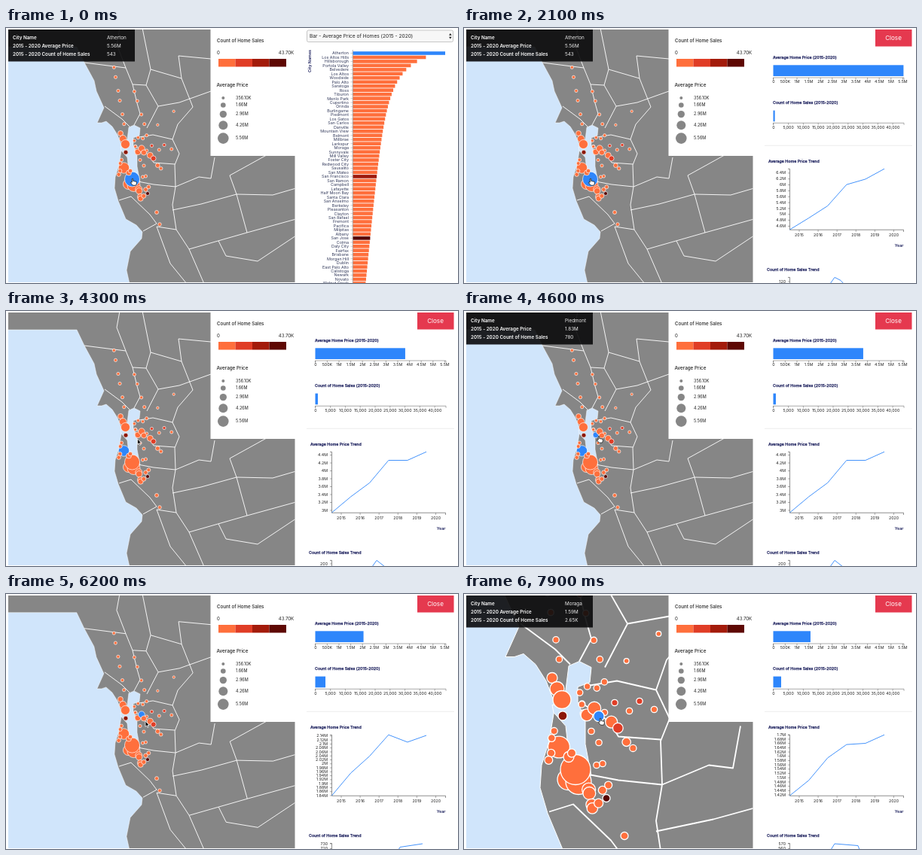
Recreate the animation shown at these times as an HTML page with a canvas. Size 600x339 px, loop 8000 ms.

```html
<!DOCTYPE html>
<html lang="en">
<head>
<meta charset="utf-8">
<title>Home sales map</title>
<style>
html, body { margin: 0; width: 100%; height: 100%; overflow: hidden; background: #fff; }
canvas { display: block; width: 600px; height: 339px; }
</style>
</head>
<body>
<canvas id="stage"></canvas>
<script>
const LOOP = 8000;
const canvas = document.getElementById('stage');
const ctx = canvas.getContext('2d');
const dpr = window.devicePixelRatio || 1;
canvas.width = 600 * dpr;
canvas.height = 339 * dpr;

const BLUE = '#2e86fb', ORANGE = '#ff6f3c', RED = '#e03d26', DARK = '#8c1708', DEEP = '#560503';
const NAVY = '#1b1f5c', LAND = '#868686', WATER = '#d0e5fb';

// ---------- data ----------
// price in millions, count in thousands; trend runs from min to max
const cities = {
  Atherton: { x: 167.5, y: 201, price: 5.56, count: 0.543, min: 4.485, max: 6.55,
    trend: [0, 0.19, 0.39, 0.74, 0.83, 1], sales: ['120', 337], peak: 'M486 340L492 331.5L500 335.5L504 340' },
  Hillsborough: { x: 156.5, y: 186, price: 3.84, count: 0.871, min: 2.943, max: 4.486,
    trend: [0, 0.26, 0.49, 0.86, 0.86, 1], sales: ['200', 336], peak: 'M486 340L492 331.5L503 340' },
  Piedmont: { x: 175, y: 164.7, price: 1.83, count: 0.78 },
  Orinda: { x: 180, y: 160.2, price: 2.06, count: 3.42, min: 1.84, max: 2.147,
    trend: [0, 0.37, 0.65, 1, 0.88, 0.99], sales: ['730', 332], peak: 'M521 340L523 336.5L553 332' },
  Moraga: { x: 183, y: 165.5, price: 1.59, count: 2.65, min: 1.4165, max: 1.701,
    trend: [0, 0.25, 0.62, 0.84, 0.86, 1], sales: ['570', 332], peak: 'M487 340L492 332L523 334.5L525 340' }
};

// towns follow the main roads: from, to, how many, first and last radius
const roads = [
  { a: [143, 51], b: [157, 129], n: 6 },
  { a: [170, 83], b: [184, 129], n: 4 },
  { a: [201, 127.5], b: [223, 112], n: 2, r: [1.7, 1.7] },
  { a: [152, 140], b: [158.5, 154.5], n: 3, r: [3.5, 6], zig: 0 },
  { a: [170, 148.5], b: [187, 144], n: 4 },
  { a: [171.5, 156], b: [173, 165], n: 4 },
  { a: [186, 160], b: [219, 158], n: 5, zig: 3, red: 2 },
  { a: [191, 168], b: [206, 188], n: 4, r: [4, 2.3], red: 4 },
  { a: [178, 175.5], b: [183, 183], n: 2, zig: 0 },
  { a: [153, 174], b: [150, 196], n: 4, r: [2.3, 2.7] },
  { a: [163, 192.5], b: [165, 190], n: 2, r: [3.5, 2.8], zig: 0 },
  { a: [181.5, 198], b: [185.5, 197], n: 2, zig: 0 },
  { a: [176, 213], b: [179, 228], n: 4, r: [4.5, 3.6] },
  { a: [182.5, 222], b: [189, 210], n: 3, r: [3, 2.5] },
  { a: [200, 245], b: [204, 261], n: 2, r: [2.5, 2.3], zig: 0 }
];

const coast = '94,25 104,46 117,70 120,84 130,106 121,126 127,126 133,124 141,131 148,142 154,158 ' +
  '150,182 145,198 144,213 149,230 159,254 173,262 181,271 180,280 165,297 160,322 164,340';
const bay = '163,132 170,129 178,133 177,143 169,146 169,156 174,168 174,184 178,205 170,203 163,190 161,172 ' +
  '153,163 152,158 159,158 161,148';
const borders = [
  '104,46 159,53 168,75 174,100 178,114 170,129',
  '159,53 147,22 151,0',
  '131,104 154,121 164,131',
  '168,75 186,76 202,104 187,133',
  '186,76 192,55 181,0',
  '192,55 233,67 248,105 228,128 221,148 195,142 177,145',
  '202,104 230,99 272,84',
  '233,67 229,37 272,41',
  '172,157 190,169 196,179 224,181',
  '221,148 230,167 224,182 225,211 196,208 175,204',
  '225,211 256,198 272,200 277,172',
  '150,229 166,224 191,248 200,260 182,270',
  '225,211 221,235 226,268 200,264 218,313 240,340',
  '226,268 243,294 263,340',
  '221,242 259,234 306,221 297,196 353,165',
  '306,221 354,222 385,213',
  '306,221 320,272 385,254',
  '243,294 320,272',
  '282,283 292,303 334,310 385,276'
];

const homes = ('Atherton,Los Altos Hills,Hillsborough,Portola Valley,Belvedere,Los Altos,Woodside,Palo Alto,Saratoga,Ross,' +
  'Tiburon,Menlo Park,Cupertino,Orinda,Burlingame,Piedmont,Los Gatos,San Carlos,Danville,Mountain View,Belmont,Millbrae,' +
  'Larkspur,Moraga,Sunnyvale,Mill Valley,Foster City,Redwood City,Sausalito,San Mateo,San Francisco,San Ramon,Campbell,' +
  'Lafayette,Half Moon Bay,Santa Clara,San Anselmo,Berkeley,Pleasanton,Clayton,San Rafael,Fremont,Pacifica,Milpitas,' +
  'Albany,San Jose,Colma,Daly City,Fairfax,Brisbane,Morgan Hill,Dublin,East Palo Alto,Calistoga,Newark,Novato,Walnut Creek').split(',');
const barLength = i => 46.5 - 0.53 * i + 76 * Math.exp(-0.4 * i ** 0.7);

// ---------- timeline ----------
const hovers = [[0, 'Atherton'], [2750, 'Hillsborough'], [4000, null], [4450, 'Piedmont'], [4800, 'Orinda'],
  [5250, 'Moraga'], [6100, null], [6850, 'Moraga']];
const picks = [[0, null], [500, 'Atherton'], [3750, 'Hillsborough'], [5100, 'Orinda'], [7400, 'Moraga']];
// each move: start, end, and the place reached
const moves = [[0, 1, 168, 200], [2400, 3000, 159, 184], [3850, 4500, 179, 166], [4650, 4850, 180.5, 161],
  [5100, 5350, 185, 169], [6200, 6400, 181, 165]];
const clicks = [300, 3250, 4950, 6450, 7300];

const at = (list, t) => list.reduce((v, [s, x]) => t >= s ? x : v, null);
const clamp = v => Math.min(1, Math.max(0, v));
const lerp = (a, b, p) => a + (b - a) * p;
const easeCubic = p => p < 0.5 ? 4 * p ** 3 : 1 - 4 * (1 - p) ** 3;
const easeSoft = p => p * p * (3 - 2 * p);

function pointerAt(t) {
  let pos = moves[0].slice(2);
  for (const [s, e, x, y] of moves) {
    const p = easeSoft(clamp((t - s) / (e - s)));
    pos = [lerp(pos[0], x, p), lerp(pos[1], y, p)];
  }
  return pos;
}

// ---------- helpers ----------
function rect(x, y, w, h, c) { ctx.fillStyle = c; ctx.fillRect(x, y, w, h); }

function text(s, x, y, size, { c = '#222', w = 400, a = 'left', bold = 0 } = {}) {
  ctx.font = `${w} ${size}px Inter, "Liberation Sans", sans-serif`;
  ctx.textAlign = a;
  ctx.textBaseline = 'middle';
  ctx.fillStyle = c;
  ctx.fillText(s, x, y);
  if (bold) {
    ctx.strokeStyle = c;
    ctx.lineWidth = bold;
    ctx.strokeText(s, x, y);
  }
}

function line(d, c, w) {
  ctx.strokeStyle = c;
  ctx.lineWidth = w;
  ctx.stroke(new Path2D(d));
}

function disc(x, y, r, c, edge) {
  ctx.beginPath();
  ctx.arc(x, y, r, 0, 7);
  ctx.fillStyle = c;
  ctx.fill();
  if (edge) { ctx.strokeStyle = '#fff'; ctx.lineWidth = edge; ctx.stroke(); }
}

const poly = s => 'M' + s.split(' ').join('L');
const oceanPath = new Path2D(poly(coast) + 'L-90 340L-90 25Z');
const bayPath = new Path2D(poly(bay) + 'Z');
const borderPath = new Path2D(borders.map(poly).join(''));

// ---------- map ----------
const town = (x, y, r, c = ORANGE) => disc(x, y, r, c, 0.65);

function drawRoad({ a, b, n, r = [2.1, 2.1], zig = 1.3, red = 0 }) {
  for (let i = 0; i < n; i++) {
    const p = i / (n - 1), side = i % 2 ? -zig : zig;
    town(lerp(a[0], b[0], p) + side / 4, lerp(a[1], b[1], p) + side, lerp(...r, p), i % red === 1 ? RED : ORANGE);
  }
}

function drawMap(t, hover, picked) {
  const zoom = 2 ** easeCubic(clamp((t - 6150) / 550));
  ctx.save();
  ctx.beginPath();
  ctx.rect(3, 2, 380.5, 336);
  ctx.clip();
  rect(3, 2, 381, 336, LAND);
  ctx.translate(187, 168.5);
  ctx.scale(zoom, zoom);
  ctx.translate(-187, -168.5);
  ctx.lineJoin = 'round';
  ctx.strokeStyle = '#fff';
  ctx.lineWidth = 0.9;
  ctx.stroke(borderPath);
  ctx.fillStyle = WATER;
  for (const p of [oceanPath, bayPath]) {
    ctx.fill(p);
    ctx.lineWidth = 0.5;
    ctx.stroke(p);
  }
  const city = name => {
    const { x, y, price } = cities[name];
    town(x, y, 1 + 1.62 * price, name === hover || name === picked ? BLUE : ORANGE);
  };
  town(162.5, 207.5, 7);
  town(169.5, 209, 8.5);
  city('Hillsborough');
  city('Atherton');
  roads.forEach(drawRoad);
  town(159, 165.2, 3, DARK);
  town(188, 220, 2.5, DEEP);
  ['Piedmont', 'Orinda', 'Moraga'].forEach(city);
  ctx.restore();
}

function drawTip(name) {
  if (!name) return;
  const { price, count } = cities[name];
  rect(3, 2, 168, 42.5, 'rgba(10,10,12,.9)');
  const rows = [
    ['City Name', name],
    ['2015 - 2020 Average Price', price + 'M'],
    ['2015 - 2020 Count of Home Sales', count < 1 ? Math.round(count * 1000) : count + 'K']
  ];
  rows.forEach(([k, v], i) => {
    text(k, 9, 12.8 + 11 * i, 6.3, { c: '#fff', w: 600 });
    text(v, 134, 12.8 + 11 * i, 6.3, { c: '#eee' });
  });
}

function drawLegend() {
  rect(271.5, 0, 113, 170, '#fff');
  text('Count of Home Sales', 280, 17, 6.2, { w: 500 });
  text('0', 280, 33, 6);
  text('43.70K', 382, 33, 6, { a: 'right' });
  [ORANGE, RED, '#a31b0b', '#5e0803'].forEach((c, i) => rect(282 + 22.5 * i, 41, 22.5, 10.5, c));
  text('Average Price', 279.5, 76, 6.3, { w: 500 });
  ['356.10K', '1.66M', '2.96M', '4.26M', '5.56M'].forEach((s, i) => {
    const y = 93 + 8.2 * i + 1.3 * i * i;
    disc(288.3, y, 2 + 1.33 * i, LAND);
    text(s, 305, y, 5.5);
  });
}

// ---------- right panel ----------
function drawList(hover) {
  ctx.beginPath();
  ctx.roundRect(399.5, 3, 194, 15.5, 2);
  ctx.fillStyle = '#f7f7f7';
  ctx.fill();
  ctx.strokeStyle = '#b9b9b9';
  ctx.lineWidth = 0.8;
  ctx.stroke();
  text('Bar - Average Price of Homes (2015 - 2020)', 403, 11, 6.6);
  ctx.fillStyle = '#222';
  ctx.fill(new Path2D('M588 9.8L589.8 7L591.6 9.8ZM588 11.8L589.8 14.6L591.6 11.8Z'));
  ctx.save();
  ctx.translate(403, 44);
  ctx.rotate(-Math.PI / 2);
  text('City Names', 0, 0, 5.4, { c: NAVY, w: 600, a: 'center' });
  ctx.restore();
  const special = { [hover]: BLUE, 'San Francisco': '#9d190b', 'San Jose': DEEP };
  homes.forEach((name, i) => {
    const y = 33.5 + 5.464 * i;
    text(name, 455, y + 0.3, 5.4, { c: '#343b5c', a: 'right' });
    line(`M457.5 ${y}H460`, '#888', 0.4);
    rect(460.5, y - 2.3, barLength(i), 4.6, special[name] || ORANGE);
  });
  line('M460.3 29V339', '#666', 0.5);
}

const heading = (s, x, y) => text(s, x, y, 5.3, { c: NAVY, w: 500, bold: 0.25 });

function hBar(title, y, width, labels, gap) {
  heading(title, 410, y);
  rect(410.5, y + 10.3, width, 14.7, BLUE);
  line(`M410.5 ${y + 29.5}V${y + 27}H584V${y + 29.5}`, '#555', 0.5);
  labels.forEach((s, i) => {
    const x = 410.8 + gap * i;
    line(`M${x} ${y + 27}v2.5`, '#555', 0.5);
    text(s, x, y + 32.7, 5.3, { a: 'center' });
  });
}

function yTick(s, y) {
  text(s, 427, y, 5.3, { a: 'right' });
  line(`M430 ${y}H432.5`, '#555', 0.5);
}

function drawTrend({ min, max, trend }) {
  heading('Average Home Price Trend', 404, 177);
  const step = max - min > 1 ? 0.2 : 0.02;
  for (let k = Math.ceil(min / step - 1e-6); k * step <= max; k++) {
    yTick(+(k * step).toFixed(2) + 'M', lerp(268, 187, (k * step - min) / (max - min)));
  }
  line('M430 187.3H432.5V268.3H583.5V271', '#444', 0.6);
  for (let i = 0; i < 6; i++) {
    const x = 445 + 25.1 * i;
    line(`M${x} 268.3v2.7`, '#555', 0.5);
    text(2015 + i, x, 275.6, 5.3, { a: 'center' });
  }
  line('M' + trend.map((v, i) => `${432.5 + 25.1 * i} ${lerp(268, 187.2, v)}`).join('L'), BLUE, 0.9);
  text('Year', 583.5, 289, 5.4, { c: NAVY, w: 600, a: 'right' });
}

function drawSales({ sales: [top, y], peak }) {
  heading('Count of Home Sales Trend', 402, 321.5);
  line('M430 331.5H432.5V340', '#444', 0.6);
  yTick(top, y);
  if (y < 335) yTick(top - 10, y + 6.5);
  line(peak, BLUE, 0.9);
}

function drawDetail(name) {
  const c = cities[name];
  rect(546, 2, 48.5, 22.5, '#e5394f');
  text('Close', 570, 13.7, 8.1, { c: '#fff', a: 'center' });
  const money = Array.from({ length: 12 }, (_, i) => i === 0 ? '0' : i === 1 ? '500K' : i / 2 + 'M');
  const counts = Array.from({ length: 9 }, (_, i) => i ? 5 * i + ',000' : '0');
  hBar('Average Home Price (2015-2020)', 39, 31.1 * c.price, money, 15.6);
  hBar('Count of Home Sales (2015-2020)', 99.3, 3.96 * c.count, counts, 19.8);
  line('M399 156.3H595', '#e4e4e4', 0.7);
  drawTrend(c);
  drawSales(c);
}

// ---------- pointer ----------
const hand = new Path2D('M-.8 .7Q0-.6 .8 .7V3.6Q1.8 3 2.4 3.9Q3.4 3.3 4 4.2Q5.4 4 5.4 5.4Q5.5 7.5 4.4 9.2H.4Q-1 7.6-2.6 5.6Q-2.5 4.2-.8 5.2Z');
const arrow = new Path2D('M0 0V7.4L1.7 5.9L2.9 8.5L4.1 8L3 5.4H5.2Z');

function drawPointer(t, hover) {
  ctx.save();
  ctx.translate(...pointerAt(t));
  for (const s of clicks) {
    const p = (t - s) / 300;
    if (p < 0 || p > 1) continue;
    ctx.globalAlpha = Math.min(1, 2 * (1 - p));
    ctx.beginPath();
    ctx.arc(0, 0, 8 + 18 * p, 0, 7);
    ctx.strokeStyle = '#161616';
    ctx.lineWidth = 0.8;
    ctx.stroke();
    ctx.globalAlpha = 1;
  }
  const resting = t > 5300 && t < 6250;
  const isHand = !resting && (hover || t > 6350);
  const shape = isHand ? hand : arrow;
  ctx.lineWidth = 0.8;
  ctx.fillStyle = isHand ? '#fff' : '#000';
  ctx.strokeStyle = isHand ? '#111' : '#fff';
  ctx.fill(shape);
  ctx.stroke(shape);
  ctx.restore();
}

function draw(now) {
  const t = now % LOOP;
  const hover = at(hovers, t), picked = at(picks, t);
  ctx.setTransform(dpr, 0, 0, dpr, 0, 0);
  rect(0, 0, 600, 339, '#fff');
  drawMap(t, hover, picked);
  drawLegend();
  drawTip(hover);
  if (picked) drawDetail(picked); else drawList(hover);
  drawPointer(t, hover);
}

const start = performance.now();
function tick() {
  draw(performance.now() - start);
  requestAnimationFrame(tick);
}
tick();
</script>
</body>
</html>
```
